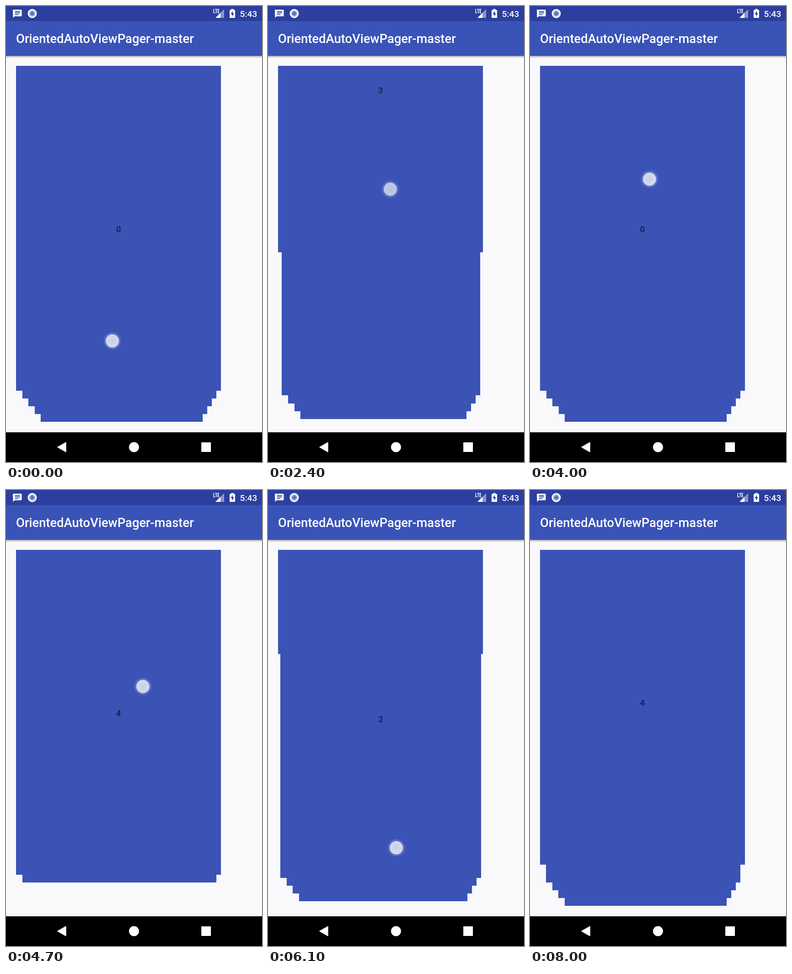
Animation of 561x998 px, one loop 8.1 s. Source, as an HTML page:

```html
<!DOCTYPE html>
<html lang="en">
<head>
<meta charset="utf-8">
<title>Stacked pager</title>
<style>
  html, body { margin: 0; width: 100%; height: 100%; overflow: hidden; background: #f9f8fb; }
  svg { display: block; width: 100%; height: 100%; }
  text { font-family: Roboto, "Open Sans", sans-serif; }
</style>
</head>
<body>
<svg viewBox="0 0 561 998">
  <defs>
    <linearGradient id="shade" x2="0" y2="1">
      <stop offset="0" stop-color="#000" stop-opacity=".36"/>
      <stop offset=".45" stop-color="#000" stop-opacity=".12"/>
      <stop offset="1" stop-color="#000" stop-opacity="0"/>
    </linearGradient>
    <radialGradient id="glow">
      <stop offset=".7" stop-color="#fff" stop-opacity=".3"/>
      <stop offset="1" stop-color="#fff" stop-opacity="0"/>
    </radialGradient>
    <radialGradient id="core">
      <stop offset="0" stop-color="#fff" stop-opacity=".6"/>
      <stop offset="1" stop-color="#fff" stop-opacity=".7"/>
    </radialGradient>
    <clipPath id="frame"><rect x="22" y="131" width="449" height="780"/></clipPath>
  </defs>

  <rect width="561" height="998" fill="#f9f8fb"/>
  <g id="pages" clip-path="url(#frame)"></g>

  <rect y="109" width="561" height="6" fill="url(#shade)"/>
  <rect y="33" width="561" height="76" fill="#3a53b7"/>
  <rect width="561" height="33" fill="#2c3f9f"/>
  <text x="22" y="81.3" font-size="27.4" font-weight="500" fill="#fff">OrientedAutoViewPager-master</text>

  <!-- status icons -->
  <path d="M15 8H33Q34.500 8 34.500 9.500V21Q34.500 22.500 33 22.500H19L15.500 26Z" fill="#fff"/>
  <path d="M19.500 11.800H31M19.500 15.200H31M19.500 18.600H27.500" stroke="#2c3f9f" stroke-width="1.700"/>
  <circle cx="57.500" cy="16.500" r="10" fill="#f4f5fb"/>
  <circle cx="57.500" cy="16.500" r="6.500" fill="#94a0d6"/>
  <circle cx="57.500" cy="16.500" r="3.500" fill="#5a6bbb"/>
  <path d="M478 7V26H459Z" fill="#8a95cb"/>
  <path d="M470 15V26H459Z" fill="#fff"/>
  <path d="M455.200 6.500V15H458.200M458.300 7.200H463M460.700 7V15.700M467.300 7.200H464.500V15H467.300M464.500 11H467"
        fill="none" stroke="#fff" stroke-width="1.500"/>
  <path d="M490 9.500Q490 8.500 491 8.500H493.500V6.500H498.500V8.500H501Q502 8.500 502 9.500V25Q502 26 501 26H491Q490 26 490 25Z" fill="#fff"/>
  <path d="M497 10.500L492.500 18H495.500V23.500L499.800 16H497Z" fill="#2c3f9f"/>
  <text x="512.500" y="23.500" font-size="19.200" font-weight="500" fill="#fff">5:43</text>

  <!-- navigation bar -->
  <rect y="933" width="561" height="65"/>
  <g fill="#fff" stroke="#fff" stroke-width="2" stroke-linejoin="round">
    <path d="M113.500 965.500L131 955.500V975.500Z"/>
    <circle cx="280.500" cy="965.500" r="10"/>
    <rect x="429" y="956" width="19" height="19"/>
  </g>

  <g id="finger">
    <circle r="20" fill="url(#glow)"/>
    <circle r="14.300" fill="url(#core)"/>
  </g>
</svg>
<script>
const LOOP = 8100, STEP = 100;
const PITCH = 780, SLOP = 22, FADE = 170, DEPTH = 5;
const CX = 246.5, CY = 486.5, W = 449, H = 711;

// press time, release time, press x, y, release x, y
const swipes = [
  [0, 350, 233, 733, 248, 398],
  [700, 1058, 238, 733, 250, 395],
  [1380, 1730, 246, 720, 260, 400],
  [2080, 2380, 254, 638, 268, 401],
  [2760, 3080, 254, 710, 266, 390],
  [4000, 4270, 262, 379, 268, 759],
  [4700, 4900, 300, 430, 290, 810],
  [5300, 5500, 295, 440, 284, 820],
  [5880, 6120, 290, 464, 280, 827.5],
  [6610, 6880, 288, 420, 280, 800],
  [7200, 7785, 286, 410, 278, 840]
].map(([down, up, x0, y0, x1, y1]) => ({ down, up, x0, y0, x1, y1 }));

const mix = (a, b, u) => a + (b - a) * u;

const svgNode = (name, attrs, parent) => {
  const node = document.createElementNS("http://www.w3.org/2000/svg", name);
  for (const key in attrs) node.setAttribute(key, attrs[key]);
  return parent.appendChild(node);
};

const stack = document.getElementById("pages");
const finger = document.getElementById("finger");
const cards = Array.from({ length: DEPTH }, () => {
  const group = svgNode("g", {}, stack);
  svgNode("rect", { x: -W / 2, y: -H / 2, width: W, height: H, fill: "#3b53b5", "shape-rendering": "crispEdges" }, group);
  const label = svgNode("text", {
    y: 8, "text-anchor": "middle", "font-size": 19.2, "font-weight": 700, "fill-opacity": 0.55
  }, group);
  return { group, label };
}).reverse();

function touchAt(s, t) {
  const u = Math.min(1, (t - s.down) / (s.up - s.down)) ** 1.5;
  const alpha = Math.max(0, 1 - Math.max(0, t - s.up) / FADE);
  return { x: mix(s.x0, s.x1, u), y: mix(s.y0, s.y1, u), alpha };
}

// Share of one page covered by a swipe: dragged first, then a quintic settle.
function progress(s, t, touch) {
  const dragged = Math.max(0, Math.abs(touch.y - s.y0) - SLOP) / PITCH;
  if (t <= s.up) return dragged;
  const u = Math.min(1, (t - s.up) / (s.y1 < s.y0 ? 600 : 500));
  return 1 - (1 - dragged) * (1 - u) ** 5;
}

function placeCard({ group, label }, index, pos) {
  const k = Math.max(0, pos);
  const x = CX + 1.8 * k;
  const y = CY + (pos < 0 ? pos * PITCH : 35.8 * k);
  group.setAttribute("transform", `translate(${x} ${y}) scale(${1 - 0.0526 * k})`);
  label.textContent = ((index % 5) + 5) % 5;
}

function render(t) {
  let scroll = 0, current;
  for (const s of swipes) {
    if (s.down > t) break;
    const touch = touchAt(s, t);
    const next = swipes[swipes.indexOf(s) + 1];
    const done = next && next.down <= t;
    scroll += (s.y1 < s.y0 ? 1 : -1) * (done ? 1 : progress(s, t, touch));
    current = touch;
  }

  const first = Math.floor(scroll + 1e-6);
  // Deeper pages are detached after the first backward release until the next one.
  const last = t >= swipes[5].up && t < swipes[6].up ? 5 : Infinity;
  cards.forEach((card, i) => {
    const index = first + i;
    card.group.style.display = index > last ? "none" : "";
    placeCard(card, index, index - scroll);
  });

  finger.setAttribute("transform", `translate(${current.x} ${current.y})`);
  finger.setAttribute("opacity", current.alpha);
}

const begin = performance.now();
function tick() {
  const t = (performance.now() - begin) % LOOP;
  render(Math.floor(t / STEP) * STEP);
  requestAnimationFrame(tick);
}
tick();
</script>
</body>
</html>
```
